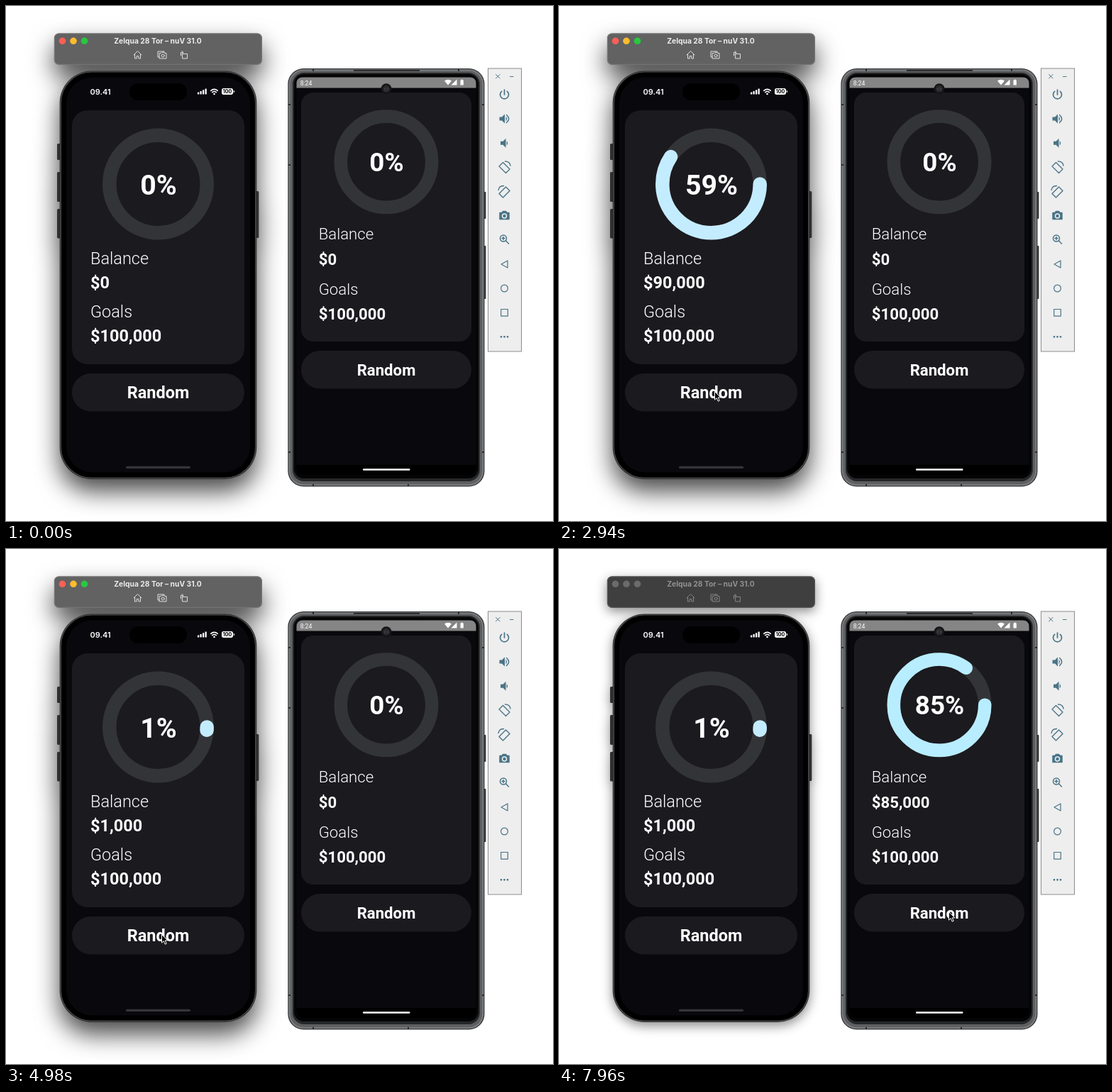
An HTML page for the animation above (8 s loop, 771 by 726 pixels).

```html
<!DOCTYPE html>
<html lang="en">
<head>
<meta charset="utf-8">
<title>Savings goal on two phones</title>
<style>
html, body { margin: 0; width: 100%; height: 100%; overflow: hidden; background: #fff; }
svg { display: block; width: 100%; height: 100%; }
text { font-family: Roboto, sans-serif; fill: #fff; }
.bold { font-weight: 700; }
.light { font-weight: 300; }
.inter { font-family: Inter, sans-serif; font-weight: 600; }
.mid { text-anchor: middle; }
.line { fill: none; stroke-linecap: round; stroke-linejoin: round; }
#win { filter: drop-shadow(0 17px 17px rgba(0,0,0,.72)); }
#bar { fill: #626262; }
#title { fill: #ececec; }
#tools { stroke: #dedede; }
.idle #win { filter: drop-shadow(0 5px 8px rgba(0,0,0,.46)); }
.idle #bar { fill: #3f3f3f; }
.idle #title { fill: #929292; }
.idle #tools { stroke: #858585; }
.idle #lights circle { fill: #6b6b6b; }
</style>
</head>
<body>
<svg id="stage" viewBox="0 0 771 726">
  <!-- left window: title bar and phone body -->
  <g id="win">
    <rect id="bar" x="67.8" y="38.2" width="293.2" height="44.8" rx="7"/>
    <rect x="68.500" y="38.900" width="291.800" height="43.400" rx="6.500" fill="none" stroke="#fff" stroke-opacity=".14"/>
    <g fill="#303032">
      <rect x="72" y="194" width="6" height="23" rx="1.5"/>
      <rect x="72" y="234" width="6" height="42" rx="1.5"/>
      <rect x="72" y="286" width="6" height="41.5" rx="1.5"/>
      <rect x="350" y="261" width="6.3" height="66" rx="1.5"/>
    </g>
    <rect x="75.700" y="91.500" width="277.600" height="575.500" rx="45" fill="#2a2a2c"/>
    <rect x="77.3" y="93" width="274.4" height="572.4" rx="43.500" fill="#000" stroke="#505052" stroke-width="1.2"/>
  </g>
  <g id="lights">
    <circle cx="79.5" cy="49.3" r="4.8" fill="#fe5f57"/>
    <circle cx="95" cy="49.3" r="4.8" fill="#febc2e"/>
    <circle cx="110.5" cy="49.3" r="4.8" fill="#28c840"/>
  </g>
  <text id="title" class="inter mid" x="214" y="53" font-size="10.3" style="font-weight:700">Zelqua 28 Tor – nuV 31.0</text>
  <g id="tools" class="line">
    <path d="M180 69l5.5-5.5 5.5 5.5M181.5 68v6h2.7v-3.5h2.6v3.5h2.7v-6"/>
    <path d="M216 72h-2v-8h9v1.5M216.5 66.5h2l1-1.2h3l1 1.2h2.5v7.5h-9.5z"/>
    <circle cx="221.2" cy="70" r="2"/>
    <path d="M249 67.5h6.5v6.500h-6.500zM246.500 70v-4.500h3M248 63.500l2 2-2 2"/>
  </g>
  <rect x="85" y="100.5" width="259" height="557" rx="37" fill="#09080d"/>
  <rect x="174" y="109" width="81" height="24" rx="12" fill="#000"/>
  <text class="inter" x="118.5" y="125" font-size="11">09.41</text>
  <g fill="#fff">
    <rect x="270" y="121.5" width="2.3" height="3" rx=".6"/>
    <rect x="273.5" y="120" width="2.3" height="4.5" rx=".6"/>
    <rect x="277" y="118.3" width="2.3" height="6.2" rx=".6"/>
    <rect x="280.5" y="116.5" width="2.3" height="8" rx=".6"/>
    <rect x="304" y="116" width="16" height="9" rx="2.7"/>
    <rect x="320.7" y="119" width="1.2" height="3" rx=".6"/>
    <circle cx="293.5" cy="124" r="1.3"/>
  </g>
  <path class="line" stroke="#fff" stroke-width="1.6" d="M288.7 119.3q4.8-4 9.6 0M290.7 121.7q2.8-2.4 5.6 0"/>
  <text class="inter mid" x="312" y="123.3" font-size="7" style="fill:#000;font-weight:700">100</text>
  <rect x="169" y="648.7" width="91" height="3.3" rx="1.6" fill="#353438"/>

  <!-- right phone: buttons, metal frame from outside in, screen -->
  <rect x="672" y="262" width="4.5" height="38" rx="1" fill="#39393b"/>
  <rect x="672" y="338" width="4.5" height="75" rx="1" fill="#39393b"/>
  <rect x="397.3" y="88" width="277.2" height="589.5" rx="22" fill="#333436"/>
  <rect x="398.5" y="89.2" width="274.8" height="587.1" rx="21" fill="#7b7c7e"/>
  <rect x="400.5" y="91.2" width="270.8" height="583.1" rx="19" fill="#5e5f61"/>
  <rect x="404" y="94" width="263.8" height="576" rx="16" fill="#252628"/>
  <rect x="406" y="96" width="259.8" height="570" rx="14" fill="#050506"/>
  <path stroke="#2a2a2c" stroke-width="2" d="M490 91h93M398 139h3M398 224h3M671 139h3M398 629h3M671 629h3M433 89v3M638 89v3M433 674v3M567 674v3"/>
  <rect x="409.5" y="100.5" width="253" height="561" rx="11" fill="#000"/>
  <rect x="409.5" y="115" width="253" height="532" fill="#09080d"/>
  <path d="M409.5 115.5v-6q0-9 9-9h235q9 0 9 9v6z" fill="#858585"/>
  <text x="414.7" y="111.5" font-size="8.6">8:24</text>
  <path fill="#fff" d="M618 105.5q5-3.5 10 0l-5 6zM635.5 103.5v8h-8zM640.5 104.5h1.3v-1h1.7v1h1.3v7h-4.3z"/>
  <rect x="503" y="652.3" width="66.5" height="2.4" rx="1.2" fill="#fff"/>

  <!-- emulator tool strip -->
  <rect x="679.5" y="88" width="47" height="399" fill="#eee" stroke="#8c8c8c"/>
  <g class="line" stroke="#4a7487" stroke-width="1.5">
    <path stroke-width="1" d="M690.5 96.5l5.5 5.5m0-5.5l-5.5 5.5M710.5 99.5h4.5"/>
    <path stroke-width="1.7" d="M702.5 118v7M698.6 120.3a6 6 0 1 0 7.8 0"/>
    <path fill="#4a7487" stroke="none" d="M695.5 156.5h3.5l4-4v13l-4-4h-3.5zM704.5 155.5q3 3.500 0 7z"/>
    <path d="M705.5 153.5q6.500 5.500 0 11"/>
    <path fill="#4a7487" stroke="none" d="M697 190.7h3.5l4-4v13l-4-4h-3.5zM705.7 190q3 3.300 0 6.500z"/>
    <g id="turn" stroke-width="1.4">
      <path d="M700.5 220.5l9.5 9.500-5.500 5.500-9.500-9.500zM703.500 219q6.500 0 7.500 6"/>
    </g>
    <use href="#turn" transform="matrix(-1 0 0 1 1405 34.5)"/>
    <path fill="#4a7487" d="M696 291.5h3l1.5-2h4l1.5 2h3v9h-13z"/>
    <circle cx="702.5" cy="296" r="3" fill="#4a7487" stroke="#eee"/>
    <circle cx="701" cy="327.5" r="4.5"/>
    <path d="M704.5 331l4 4M699 327.5h4M701 325.5v4"/>
    <path stroke-width="1.2" d="M707 359v10l-9-5z"/>
    <circle cx="702.5" cy="398" r="4.9" stroke-width="1.2"/>
    <rect x="697.7" y="427.5" width="9.6" height="9.6" stroke-width="1.2"/>
    <path stroke-width="2.8" d="M698 466.3h0M702.5 466.3h0M707 466.3h0"/>
  </g>

  <g id="apps"></g>
  <!-- front camera -->
  <circle cx="536" cy="116.8" r="7.5" fill="#151517"/>
  <circle cx="536" cy="116.8" r="4.8" fill="#2b2c2d"/>
  <path class="line" stroke="#55575a" stroke-width="1.6" d="M534 117h0M538 117h0"/>
  <path id="cursor" d="M.5 .5v11.6l2.7-2.5 2 4.6 2-.9-2-4.4h3.6z" fill="#000" stroke="#fff"/>
</svg>
<script>
const LOOP = 8000, GROW = 1000, BLUR_AT = 5980;
const $ = id => document.getElementById(id);
const clamp = v => Math.min(1, Math.max(0, v));
const quad = t => t < .5 ? 2 * t * t : 1 - 2 * (1 - t) ** 2;

// taps: [finger down, value starts moving, new percentage]
const phones = [
  { x: 93, w: 243, top: 147, h: 358, r: 22, cx: 214.5, cy: 251, radius: 68.7, ring: 19.5,
    color: '#c4ecff', big: 39.3, bigY: 265.6, size: 23.5, textX: 119, rows: [363.6, 398.2, 438.6, 472.8],
    btn: 518, btnY: 552.8, taps: [[940, 1185, 45], [2525, 2540, 90], [3870, 3990, 1]] },
  { x: 416, w: 240, top: 122, h: 351, r: 17, cx: 536, cy: 219.7, radius: 64.2, ring: 18.6,
    color: '#b8edff', big: 36.8, bigY: 232.6, size: 22.2, textX: 440.7, rows: [329, 364.7, 406.7, 442],
    btn: 486, btnY: 521, taps: [[6750, 6970, 85]] }
];

function build(p) {
  const g = document.createElementNS('http://www.w3.org/2000/svg', 'g');
  const row = (i, cls, text) =>
    `<text class="${cls}" x="${p.textX}" y="${p.rows[i]}" font-size="${p.size}">${text}</text>`;
  const circle = (color, extra) => `<circle cx="${p.cx}" cy="${p.cy}" r="${p.radius}" fill="none"
    stroke="${color}" stroke-width="${p.ring}" ${extra}/>`;
  g.innerHTML = `
    <rect x="${p.x}" y="${p.top}" width="${p.w}" height="${p.h}" rx="${p.r}" fill="#1b1a1f"/>
    ${circle('#333438', '')}
    ${circle(p.color, 'class="arc" pathLength="100" stroke-linecap="round"')}
    <text class="pct bold mid" x="${p.cx + .5}" y="${p.bigY}" font-size="${p.big}"></text>
    ${row(0, 'light', 'Balance')}${row(1, 'sum bold', '')}
    ${row(2, 'light', 'Goals')}${row(3, 'bold', '$100,000')}
    <g class="btn">
      <rect x="${p.x}" y="${p.btn}" width="${p.w}" height="53.5" rx="26.7" fill="#1b1a1f"/>
      <text class="bold mid" x="${p.cx}" y="${p.btnY}" font-size="${p.size}">Random</text>
    </g>`;
  $('apps').append(g);
  for (const name of ['arc', 'pct', 'sum', 'btn']) p[name] = g.querySelector('.' + name);
}

function drawApp(p, t) {
  let value = 0, goal = 0, opacity = 1;
  for (const [down, start, to] of p.taps) {
    const up = Math.max(start, down + 130);
    const press = quad(clamp((Math.min(t, up) - down) / 150));
    opacity -= .8 * press * (1 - quad(clamp((t - up) / 250)));
    if (t >= start) {
      value = goal + (to - goal) * quad(clamp((t - start) / GROW));
      goal = to;
    }
  }
  p.arc.style.visibility = value > 0 ? 'visible' : 'hidden';
  p.arc.setAttribute('stroke-dasharray', `${value} 200`);
  p.pct.textContent = Math.round(value) + '%';
  p.sum.textContent = '$' + (goal * 1000).toLocaleString('en-US');
  p.btn.setAttribute('opacity', opacity);
}

// pointer stops: time, x, y
const path = [[40, 250, 735], [320, 219, 533], [640, 219, 533], [760, 219, 543],
  [5440, 219, 543], [5960, 556, 481], [6220, 556, 481], [6400, 549, 511]];

function pointerAt(t) {
  let [, x, y] = path[0];
  for (let i = 1; i < path.length; i++) {
    const [t0, x0, y0] = path[i - 1], [t1, x1, y1] = path[i];
    if (t < t0) break;
    const k = quad(clamp((t - t0) / (t1 - t0)));
    x = x0 + (x1 - x0) * k;
    y = y0 + (y1 - y0) * k;
  }
  return [x, y];
}

function frame() {
  const t = performance.now() % LOOP;
  for (const p of phones) drawApp(p, t);
  $('cursor').setAttribute('transform', `translate(${pointerAt(t)})`);
  $('stage').classList.toggle('idle', t >= BLUR_AT);
  requestAnimationFrame(frame);
}

phones.forEach(build);
frame();
</script>
</body>
</html>
```
